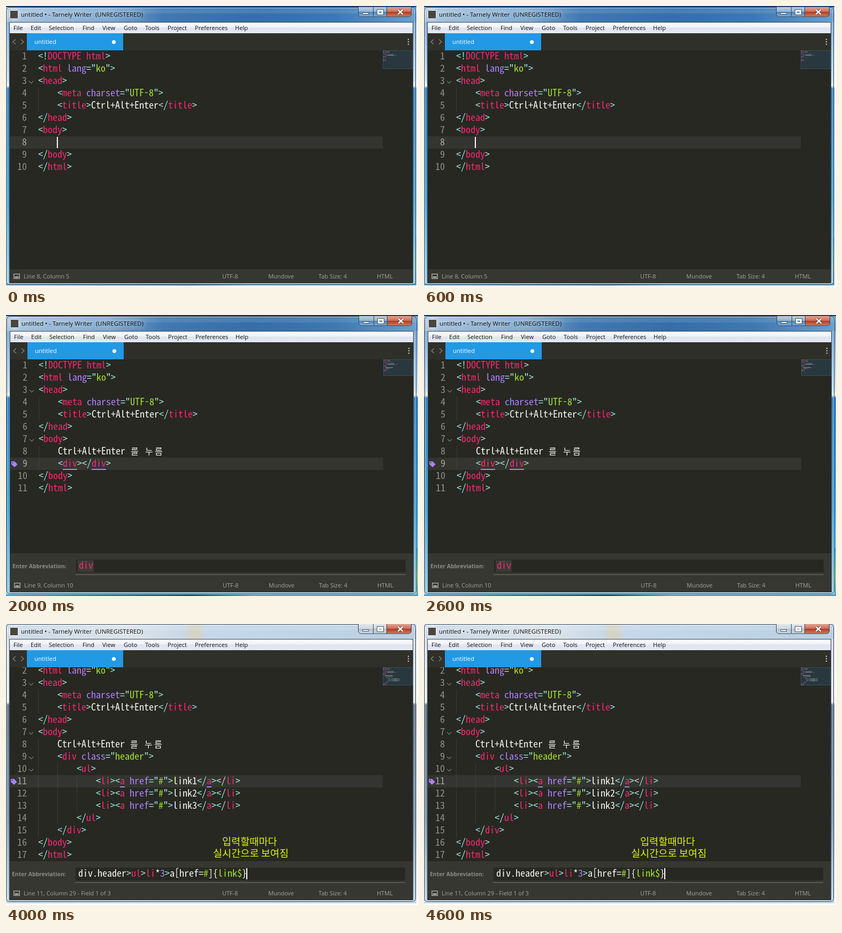
An HTML page with a canvas that plays this animation: 770 by 526 pixels, repeating every 5000 ms.

```html
<!DOCTYPE html>
<html lang="ko">
<head>
<meta charset="UTF-8">
<title>Editor demo</title>
<style>
html, body { margin: 0; width: 770px; height: 526px; overflow: hidden; background: #fff; }
canvas { display: block; }
</style>
</head>
<body>
<canvas id="stage" width="770" height="526"></canvas>
<script>
const ctx = document.getElementById('stage').getContext('2d');
const UI = '"Open Sans", "Noto Sans", sans-serif';
const HANGUL = '"Noto Sans CJK KR", "Noto Sans CJK", sans-serif';
const CODE = '"Noto Sans Mono CJK KR", "Noto Sans Mono", monospace';
const CELL = 9, ROW = 23;
const C = {
  bg: '#272822', bar: '#2f3029', panel: '#363731', line: '#343530', text: '#f8f8f2',
  punct: '#a1efe4', pink: '#f92672', purple: '#ae81ff', str: '#a6e22e',
  num: '#8f908a', status: '#a2a39d', blue: '#2299e5', note: '#def800'
};

// Font size at which one character fills one cell.
ctx.font = '100px ' + CODE;
const MONO = CELL * 100 / ctx.measureText('0').width + 'px ' + CODE;

const head = [
  '<!DOCTYPE html>', '<html lang="ko">', '<head>', '    <meta charset="UTF-8">',
  '    <title>Ctrl+Alt+Enter</title>', '</head>', '<body>'
];
const tail = ['</body>', '</html>'];
const pressed = '    Ctrl+Alt+Enter 를 누름';
const links = [1, 2, 3].map(n => `            <li><a href="#">link${n}</a></li>`);
const typed = [...head, pressed, '    <div></div>', ...tail];
const list = [...head, pressed, '    <div class="header">', '        <ul>', ...links,
  '        </ul>', '    </div>', ...tail];

const divPanel = {
  w: 770, h: 526, ox: 1, oy: 0, code: typed, row: 9, folds: [3, 7], map: 31,
  marks: [[5, 3], [11, 3]], abbr: [['div', C.pink]], status: 'Line 9, Column 10'
};
const scenes = [
  { w: 767, h: 523, ox: 0, oy: 0, code: [...head, '    ', ...tail], row: 8, folds: [3],
    map: 35, caret: true, status: 'Line 8, Column 5' },
  { w: 767, h: 526, ox: 0, oy: 1, code: [...head, pressed, '    ', ...tail], row: 9, folds: [3],
    map: 35, caret: true, status: 'Line 9, Column 5' },
  divPanel,
  { ...divPanel, arrow: true, notes: [
    ['그럼 여기에 실시간으로 보여집니다.', 409, 285, 18.7],
    ['여기에 젠코딩으로 작성을 합니다.', 219, 455, 18.7]] },
  { w: 767, h: 523, ox: 0, oy: -2, code: list, row: 11, folds: [3, 7, 9, 10], map: 34,
    scroll: 28, pale: true, marks: [[17, 1], [35, 1]], abbrCaret: true,
    status: 'Line 11, Column 29 - Field 1 of 3',
    abbr: [['div.header', C.text], ['>', C.punct], ['ul', C.pink], ['>', C.punct], ['li', C.pink],
      ['*', C.text], ['3', C.purple], ['>', C.punct], ['a[href=', C.text], ['#', C.str],
      [']{', C.text], ['link$', C.str], ['}', C.text]],
    notes: [['입력할때마다', 404, 416, 18.6], ['실시간으로 보여짐', 387, 438, 18.6]] }
];

function rect(x, y, w, h, fill) {
  ctx.fillStyle = fill;
  ctx.fillRect(x, y, w, h);
}

function text(s, x, y, font, fill) {
  ctx.font = font;
  ctx.fillStyle = fill;
  ctx.fillText(s, x, y);
}

function stroke(points, color, width = 1) {
  ctx.strokeStyle = color;
  ctx.lineWidth = width;
  ctx.beginPath();
  points.forEach(([x, y]) => ctx.lineTo(x, y));
  ctx.stroke();
}

function poly(points, fill) {
  ctx.fillStyle = fill;
  ctx.beginPath();
  points.forEach(([x, y]) => ctx.lineTo(x, y));
  ctx.fill();
}

function dot(x, y, r, fill) {
  ctx.fillStyle = fill;
  ctx.beginPath();
  ctx.arc(x, y, r, 0, 7);
  ctx.fill();
}

function fade(x0, y0, x1, y1, ...stops) {
  const g = ctx.createLinearGradient(x0, y0, x1, y1);
  stops.forEach(([at, color]) => g.addColorStop(at, color));
  return g;
}

function tokens(line) {
  const out = [], doctype = line[1] === '!';
  let inTag = false;
  for (const part of line.match(/<[!\/]?\w+|>|"[^"]*"|=|[^<>="]+/g) || []) {
    if (part[0] === '<') {
      const open = part.match(/^<[!\/]?/)[0];
      out.push([open, C.punct], [part.slice(open.length), C.pink]);
      inTag = true;
    } else if (part[0] === '"') {
      out.push(['"', C.punct], [part.slice(1, -1), C.str], ['"', C.punct]);
    } else if (part === '>' || part === '=') {
      out.push([part, C.punct]);
      if (part === '>') inTag = false;
    } else {
      out.push([part, doctype ? C.pink : inTag ? C.purple : C.text]);
    }
  }
  return out;
}

// Hangul takes two cells, everything else one.
function run(parts, x, y) {
  for (const [s, color] of parts) {
    for (const piece of s.match(/[가-힣]|[^가-힣]+/g) || []) {
      const wide = /[가-힣]/.test(piece);
      text(piece, wide ? x + 1 : x, y, wide ? '300 16px ' + HANGUL : MONO, color);
      x += CELL * (wide ? 2 : piece.length);
    }
  }
}

function drawFrame(s) {
  const { w, h, pale, ox, oy } = s;
  rect(0, 0, w, h, pale
    ? fade(0, 0, 0, h, [0, '#d3dde6'], [.28, '#e6edf2'], [.29, '#66798f'], [.7, '#7f9cb6'], [1, '#c3dbe8'])
    : fade(0, 0, 0, h, [0, '#6fa3d4'], [.27, '#c8e2f4'], [.285, '#f4fafd'], [.295, '#3487c8'], [.7, '#4aa9dc'], [1, '#9dd4ec']));
  rect(0, 0, w, 30 + oy, pale
    ? fade(0, 0, w, 0, [0, '#c9d8e6'], [.3, '#dce4ea'], [.43, '#c9d9e8'], [.46, '#d8d2bd'], [.49, '#c6d8e9'], [1, '#b9cfe2'])
    : fade(0, 0, w, 0, [0, '#a9c4de'], [.25, '#7fa9d0'], [.38, '#4179b2'], [.6, '#356ea8'], [.8, '#3d78b2'], [1, '#6a9fd0']));
  rect(0, 0, w, 14 + oy, 'rgba(255,255,255,.1)');
  if (!pale) {
    rect(0, 0, w, 2 + oy, '#0d3868');
    rect(w - 3, h - 90, 3, 90, fade(0, h - 90, 0, h, [0, '#4aa9dc'], [.6, '#8fc48a'], [1, '#5aa6cf']));
    rect(0, h - 3, w, 3, fade(0, 0, w, 0, [0, '#5a9fd0'], [.45, '#1c4c7c'], [.6, '#58a3cf'], [1, '#4d9cca']));
  }
  ctx.strokeStyle = '#25384c';
  ctx.lineWidth = 1;
  ctx.beginPath();
  ctx.roundRect(ox + .5, 2.5 + oy, 765, 519, 6);
  ctx.stroke();
  ctx.strokeStyle = 'rgba(255,255,255,.6)';
  ctx.beginPath();
  ctx.roundRect(ox + 1.5, 3.5 + oy, 763, 517, 5);
  ctx.stroke();
}

function drawTitle(pale) {
  ctx.save();
  ctx.shadowColor = '#fff';
  ctx.shadowBlur = 10;
  rect(8, 9, 14, 14, '#4b453d');
  text('untitled • - Tarnely Writer', 28, 20, '11.4px ' + UI, '#111');
  text('(UNREGISTERED)', 167, 20, '11.4px ' + UI, '#111');
  ctx.restore();

  const glass = pale
    ? fade(0, 2, 0, 20, [0, '#e3e8ec'], [.5, '#cdd7df'], [.52, '#b3c0cb'], [1, '#cfdae2'])
    : fade(0, 2, 0, 20, [0, '#b9d0e6'], [.5, '#8fb2d4'], [.52, '#5082b4'], [1, '#7fb0da']);
  const red = fade(0, 2, 0, 20, [0, '#e0a394'], [.5, '#cc6a55'], [.52, '#b03a22'], [1, '#d2805f']);
  [[658, 28, glass, [0, 0, 0, 5]], [686, 25, glass, [0]], [711, 46, red, [0, 0, 5, 0]]]
    .forEach(([x, bw, fill, r]) => {
      ctx.beginPath();
      ctx.roundRect(x + .5, 1.5, bw, 18.5, r);
      ctx.fillStyle = fill;
      ctx.fill();
      ctx.strokeStyle = '#33475c';
      ctx.lineWidth = 1;
      ctx.stroke();
    });
  ctx.fillStyle = '#fff';
  ctx.strokeStyle = '#4a5661';
  ctx.fillRect(666, 12, 12, 4);
  ctx.strokeRect(666.5, 12.5, 11, 3);
  ctx.strokeRect(693.5, 6.5, 12, 10);
  ctx.lineWidth = 3;
  ctx.strokeStyle = '#fff';
  ctx.strokeRect(695.5, 8.5, 8, 6);
  for (const [color, width] of [['#5d3430', 4.5], ['#fff', 2.6]]) {
    stroke([[732.5, 7], [741.5, 15.5]], color, width);
    stroke([[741.5, 7], [732.5, 15.5]], color, width);
  }
}

function drawMenu() {
  rect(6, 30, 755, 489, '#39424a');
  rect(7, 31, 753, 20, fade(0, 31, 0, 51, [0, '#fdfdfe'], [.45, '#eef1f8'], [.5, '#dde3f0'], [1, '#e6eaf5']));
  const at = [14, 46, 80, 143, 180, 220, 260, 302, 353, 428];
  'File Edit Selection Find View Goto Tools Project Preferences Help'.split(' ')
    .forEach((name, i) => text(name, at[i], 45, '11.1px ' + UI, '#111'));
}

function drawTabs() {
  rect(7, 51, 753, 32, C.bar);
  rect(39, 51, 180, 32, C.blue);
  text('untitled', 53, 71, '11.3px ' + UI, '#fff');
  dot(201.5, 67.5, 3.6, '#fff');
  stroke([[18, 62.5], [13, 67], [18, 71.5]], '#85867f', 1.3);
  stroke([[28, 62.5], [33, 67], [28, 71.5]], '#85867f', 1.3);
  [62.5, 67, 71.5].forEach(y => dot(752, y, 1.2, '#c8c8c4'));
}

function drawMinimap(s) {
  rect(704, 83, 56, s.map, '#28383e');
  ctx.strokeStyle = '#3a4d54';
  ctx.lineWidth = 1;
  ctx.strokeRect(704.5, 83.5, 55, s.map - 1);
  ctx.globalAlpha = .5;
  s.code.forEach((line, i) => {
    let x = 705;
    for (const [part, color] of tokens(line)) {
      const gap = part.length - part.trimStart().length;
      rect(x + gap * .75, 84 + i * 2, (part.length - gap) * .75, 1, color);
      x += part.length * .75;
    }
  });
  ctx.globalAlpha = 1;
}

function drawCode(s) {
  const top = 83 - (s.scroll || 0);
  rect(7, 83, 753, 410, C.bg);
  ctx.save();
  ctx.beginPath();
  ctx.rect(7, 83, 753, 410);
  ctx.clip();
  s.code.forEach((line, i) => {
    const y = top + i * ROW, n = i + 1;
    if (n === s.row) rect(7, y, 697, ROW, C.line);
    const depth = line.match(/^ */)[0].length / 4;
    if (n !== s.row || s.marks) {
      for (let d = 0; d < depth; d++)
        for (let k = 1; k < ROW; k += 2) rect(60 + d * 36, y + k, 1, 1, '#4d4e47');
    }
    run([[String(n), n === s.row ? '#a3a49d' : C.num]], 39 - String(n).length * CELL, y + 17);
    if (s.folds.includes(n))
      stroke([[43, y + 11.5], [47, y + 15.5], [51, y + 11.5]], '#777870', 1.2);
    run(tokens(line), 60, y + 17);
  });
  const y = top + (s.row - 1) * ROW;
  if (s.caret) rect(95, y + 1, 2, 21, '#fff');
  if (s.marks) {
    s.marks.forEach(([col, n]) => rect(60 + col * CELL, y + 21, n * CELL, 2, C.purple));
    poly([[9, y + 7], [15, y + 7], [20.5, y + 12.5], [15, y + 18], [9, y + 12.5]], C.purple);
    dot(11.6, y + 9.6, 1.1, C.line);
  }
  ctx.restore();
  drawMinimap(s);
}

function drawStatus(s) {
  const top = s.abbr ? 446 : 493;
  rect(7, top, 753, 519 - top, C.panel);
  if (s.abbr) {
    text('Enter Abbreviation:', 11, 474, 'bold 10.4px ' + UI, '#8b8c86');
    rect(130, 458, 616, 24, C.bg);
    rect(129, 485, 617, 2, '#565751');
    if (!s.abbrCaret) rect(133, 459, 30, 22, '#3a3b36');
    run(s.abbr, 135, 475);
    if (s.abbrCaret) rect(449, 459, 2, 21, '#fff');
  }
  ctx.strokeStyle = C.status;
  ctx.lineWidth = 1.5;
  ctx.strokeRect(14.75, 501.75, 10.5, 8.5);
  rect(16.5, 506, 7, 3, C.status);
  [[s.status, 33], ['UTF-8', 404], ['Mundove', 490], ['Tab Size: 4', 584], ['HTML', 693]]
    .forEach(([label, x]) => text(label, x, 510, '11px ' + UI, C.status));
}

function drawArrow() {
  poly([[218, 282], [272, 273.5], [260, 280.6], [389, 279], [389, 281.5], [260, 283], [276, 290.5]], C.note);
}

function draw(s) {
  ctx.setTransform(1, 0, 0, 1, 0, 0);
  rect(0, 0, 770, 526, '#fff');
  ctx.save();
  ctx.beginPath();
  ctx.rect(0, 0, s.w, s.h);
  ctx.clip();
  drawFrame(s);
  ctx.translate(s.ox, s.oy);
  drawTitle(s.pale);
  drawMenu();
  drawCode(s);
  drawTabs();
  drawStatus(s);
  if (s.arrow) drawArrow();
  (s.notes || []).forEach(([label, x, y, size]) => text(label, x, y, size + 'px ' + HANGUL, C.note));
  ctx.restore();
}

const start = performance.now();
function tick() {
  const t = (performance.now() - start) % 5000;
  draw(scenes[Math.floor(t / 1000)]);
  requestAnimationFrame(tick);
}
tick();
</script>
</body>
</html>
```
